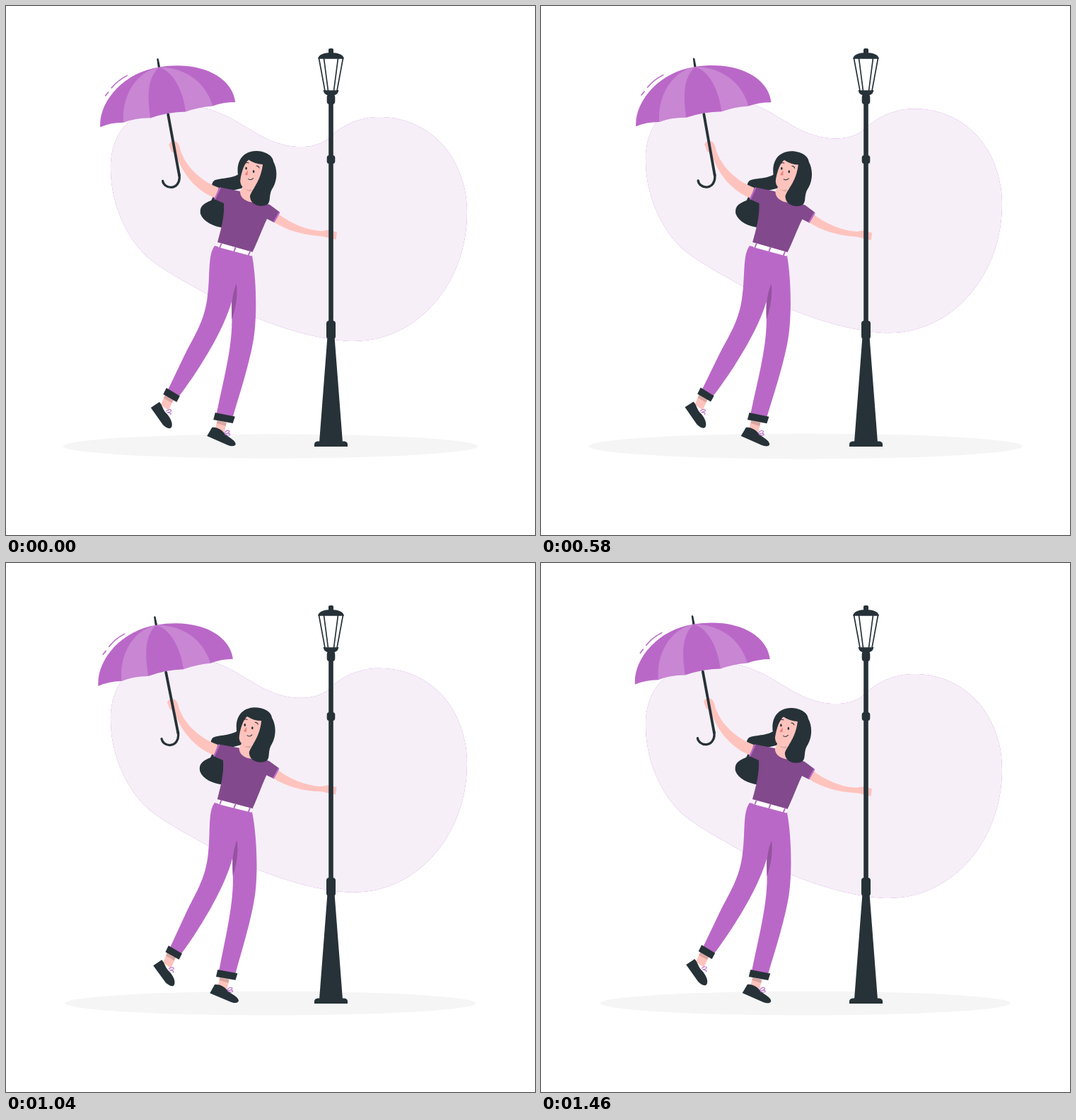
Animation of 748 by 748 pixels, one loop 1.5 s. Source, as an HTML page:

```html
<!DOCTYPE html>
<html lang="en">
<head>
<meta charset="utf-8">
<title>Girl with umbrella</title>
<style>
html, body { margin: 0; width: 100%; height: 100%; overflow: hidden; background: #fff; }
svg { display: block; width: 100vw; height: 100vh; }
.dark { fill: #263238; }
.purple { fill: #ba68c8; }
.skin { fill: #ffc3bd; }
.shirt { fill: #82498c; }
.line { fill: none; stroke: #263238; stroke-linecap: round; }
.trim { fill: none; stroke: #ba68c8; stroke-linecap: round; }
</style>
</head>
<body>
<svg viewBox="0 0 748 748">
  <defs>
    <path id="cloud" d="M148 230C148 190 165 141 252 141C306 141 340 176 374 190C400 201 433 204 455 188C475 168 500 157 528 157C600 157 652 215 652 292C652 392 582 474 492 474C430 474 340 438 300 416C260 394 225 375 205 359C175 335 148 285 148 230Z"/>
  </defs>

  <g id="blob">
    <use href="#cloud" class="purple"/>
    <use href="#cloud" fill="#f6eff8"/>
  </g>
  <ellipse id="shadow" cx="374" cy="622.5" rx="290" ry="17" fill="#f5f5f5"/>

  <g id="girl">
    <!-- umbrella -->
    <path class="dark" d="M213 75Q214 73 215.5 75L218 87H214.5Z"/>
    <path class="purple" d="M133 171.500C131 135 166 94 216 86.500C274 77 320 100 324 136Q307 136 292 141.500Q272 143 254 149.500Q228 150 204 158.500Q184 158 166 165Q148 165 133 171.500Z"/>
    <g fill="#fff" opacity=".2">
      <path d="M216 86.500C184 93 163 127 166 165Q184 158 204 158.500C199 126 200 102 216 86.500Z"/>
      <path d="M216 86.500C236 92 250 119 254 149.500Q272 143 292 141.500C283 110 256 87 216 86.500Z"/>
    </g>
    <path class="trim" stroke-width="1.600" d="M149 116Q158 105 171 98.500M140.500 127L144.500 122"/>

    <!-- hair behind the body -->
    <path class="dark" d="M335 232C325 246 303 242 294 247C286 255 298 263 290 275C280 279 273 283 275 294C279 305 293 312 308 313.500L316 262L340 256Z"/>

    <!-- arms -->
    <path class="skin" d="M301 257C278 249 257 230 249 210C246 205 246 197 242 193Q237 189 232 193L230 196L234 206L240 209C249 238 270 262 296 272Z"/>
    <path class="line" stroke-width="3.800" d="M229 153.500L245 240"/>
    <path class="line" stroke-width="3.300" d="M244.700 238C247 250 240 256 234 256.500C227 257 222 252 221.500 247.500"/>
    <path class="skin" d="M385 294C401 306 423 317 446 318L455 316.500L468 319.500L466.500 330L458 328L447 325.500C420 324 396 317 378 305Z"/>

    <!-- legs -->
    <g class="skin">
      <path d="M225 550L237 557L230 572L219 564Z"/>
      <path d="M299 586L312 589L309 603L296 598Z"/>
    </g>
    <g fill="#d9a6a1">
      <path d="M225 550L237 557L234.500 561L223 554.500Z"/>
      <path d="M299 586L312 589L311 594L298 590Z"/>
    </g>
    <path class="purple" d="M295 339L348 353C354 385 355 435 351 465C347 498 330 550 321 581L298 576C307 531 320 484 319.500 443L319 418C309 455 278 508 244 553L229 543L252 495C265 468 281 447 285 410C289 382 285 352 295 339Z"/>
    <path fill="#9553a0" d="M326 392C321 405 318 419 319.500 443C325 427 328 410 326 392Z"/>
    <g class="dark">
      <path d="M227 540L246 551.500L241.500 560L222.500 549Z"/>
      <path d="M296 575L324 580.500L321 590L293.500 585Z"/>
      <path d="M205 568L217 560C221 563 222 572 228 577C233 583 237 591 234 596C231 599 226 596 222 592Z"/>
      <path d="M291.500 596C298 595 305 599 309 604C314 610 324 613 325 619C325 623 319 623 314 621L284.500 608Z"/>
    </g>
    <path class="trim" stroke-width="1.100" d="M227 573Q232 569 234 572Q234 574 228 575Q235 575 233 578M309 604Q312 599 316 601Q317 604 310 605Q317 603 317 606Q315 608 310 606"/>

    <!-- shirt and belt -->
    <path class="shirt" d="M303 256.500L331 262C336 276 347 279 358 276L373 281L387 291.500L379 306L369 301C361 318 355 335 348.500 348L299 334C304 316 309 298 308 279L294.500 273Z"/>
    <path class="trim" stroke-width="2.200" d="M302.500 257.500L295.500 272.500M386 292.500L379 305"/>
    <path fill="#fff" d="M302 335L348.500 348L347 353.500L300 341Z"/>
    <path class="trim" stroke-width="2" d="M304.500 336L302.500 341M324.500 341.500L322.500 346.500M345 347L343 352"/>

    <!-- head -->
    <path class="skin" d="M336 252L331 262C330 273 345 281 358 276L348 256Z"/>
    <path fill="#d9a6a1" d="M336 257Q341 262 347 259L346 262Q340 262 336 257Z"/>
    <path class="skin" d="M341 217C333 226 329 243 332 252C335 259 345 262 352 256C361 249 365 235 364 222Z"/>
    <path class="dark" d="M329 245C324 224 331 206 353 205C366 205 377 211 378 220C384 231 384 247 376 259C371 268 375 277 369 281C357 286 344 279 345 268C349 257 360 248 363 224Q353 224 343 217.500C337 222 333 234 331 247Z"/>
    <g class="dark">
      <ellipse cx="339.500" cy="229.500" rx="1.300" ry="2"/>
      <ellipse cx="350" cy="234" rx="1.300" ry="2"/>
    </g>
    <path class="line" stroke-width="1" d="M339 222Q341 220.500 343 222M354 226Q357 226 358 229M342.500 244.500Q346 247 349.500 243.500"/>
    <path fill="#ed847e" d="M342 232L337.500 238Q339 240 341.500 239Z"/>
  </g>

  <!-- street lamp -->
  <g class="dark">
    <rect x="456" y="60" width="7" height="9" rx="2"/>
    <path d="M441 74.500Q443 66 459.500 66Q476 66 478 74.500Z"/>
    <path d="M448.500 119H470.500Q469 127 459.500 127Q450 127 448.500 119Z"/>
    <rect x="453.700" y="125" width="11.600" height="14" rx="4"/>
    <rect x="456.200" y="135" width="6.600" height="320"/>
    <rect x="453.700" y="211" width="11.600" height="12" rx="3.500"/>
    <rect x="453" y="445" width="13" height="26" rx="4"/>
    <path d="M454.300 470H464.700L476 617H443Z"/>
    <path d="M436 623V619Q437 615.500 441 615.500H478Q482 615.500 483 619V623Z"/>
  </g>
  <path fill="#fff" stroke="#263238" stroke-width="1.700" d="M442.500 74L451 120H468L476.500 74Z"/>
  <path class="line" stroke-width="1.700" d="M449.500 74L455.500 120M469.500 74L463.500 120"/>
</svg>
<script>
const LOOP = 1500, STEPS = 36;
const get = id => document.getElementById(id);
const [blob, girl, shadow] = ["blob", "girl", "shadow"].map(get);

// Linear interpolation through [phase, value] keys
function track(keys, p) {
  const i = keys.findIndex(key => key[0] > p);
  const [p0, v0] = keys[i - 1], [p1, v1] = keys[i];
  return v0 + (v1 - v0) * (p - p0) / (p1 - p0);
}

const rise = [[0, 0], [.5, -15], [1, 0]];
const sway = [[0, 0], [.25, 1], [.75, -1], [1, 0]];
const beat = [[0, 1], [.12, 1.1], [.275, 1], [.5, 1.1], [.59, 1], [1, 1]];

function draw() {
  const step = Math.floor((performance.now() + 4) % LOOP / LOOP * STEPS);
  const p = (step + .5) / STEPS;
  blob.setAttribute("transform", `translate(0 ${track(rise, p) + .4})`);
  girl.setAttribute("transform", `rotate(${track(sway, p)} 300.5 348)`);
  shadow.setAttribute("transform", `translate(374 622.5) scale(${track(beat, p)}) translate(-374 -622.5)`);
  requestAnimationFrame(draw);
}
draw();
</script>
</body>
</html>
```
